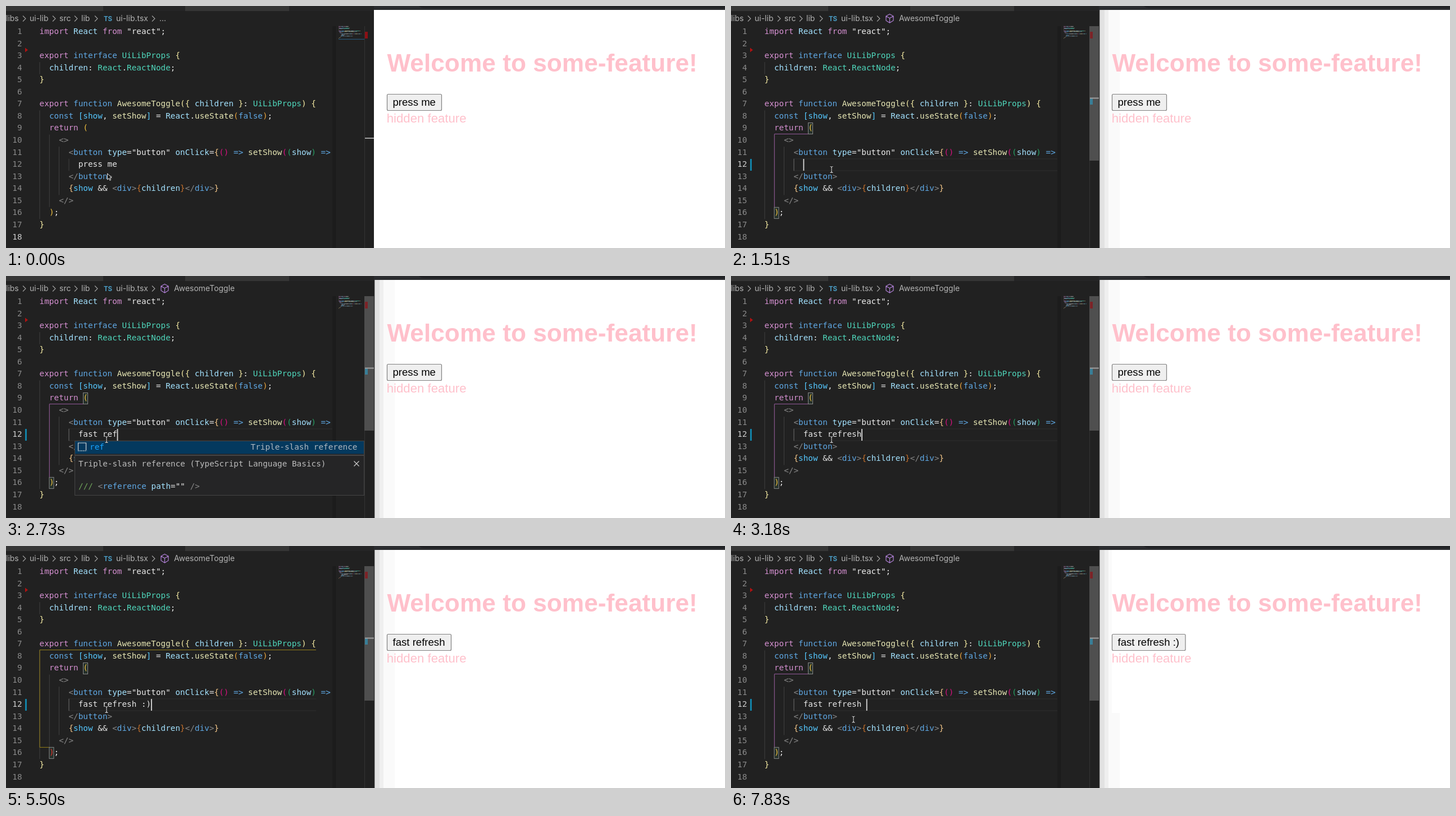
These frames come from a looping animation (1280x432 px, 8000 ms). An HTML page:

```html
<!DOCTYPE html>
<html lang="en">
<head>
<meta charset="utf-8">
<title>Fast refresh</title>
<style>
html, body { margin: 0; width: 100%; height: 100%; overflow: hidden; background: #212121; }
svg { display: block; width: 100%; height: 100%; }
text { white-space: pre; }
.code { font: 14.35px "DejaVu Sans Mono", "Noto Sans Mono", monospace; font-variant-ligatures: none; }
.crumb { font: 14px Inter, "Liberation Sans", sans-serif; fill: #b2b2b2; }
.page { font-family: "Liberation Sans", Arial, sans-serif; }
</style>
</head>
<body>
<svg id="stage" viewBox="0 0 1280 432" preserveAspectRatio="none"></svg>
<script>
const LOOP = 8000;
const CHAR = 8.64, LEFT = 59.6, ROW = 21.56, TOP = 35.5, BASE = 50;

// One letter after each "~" picks the colour of the text that follows.
const COLORS = {
  p: "#d48fd0", b: "#5fa8e4", t: "#4fd6bb", v: "#a3e2ff", f: "#e6e6b4", s: "#ececec",
  w: "#e6e6e6", g: "#868686", c: "#55c8ff", y: "#f5eba4", o: "#e8a33d", d: "#c5702a",
  m: "#d6127f", e: "#27a065", k: "#f0c040", n: "#6fa35a", h: "#18a3ff", r: "#e5312b", a: "#f5c88a"
};
const CODE = [
  '~pimport ~vReact ~pfrom ~s"react"~w;',
  '',
  '~pexport ~binterface ~tUiLibProps ~y{',
  '~w  ~vchildren~w: ~tReact~w.~tReactNode~w;',
  '~y}',
  '',
  '~pexport ~bfunction ~fAwesomeToggle~y({ ~vchildren ~y}~w: ~tUiLibProps~y) {',
  '~w  ~bconst ~c[show~w, ~fsetShow~c] ~w= ~vReact~w.~fuseState~o(~bfalse~o)~w;',
  '~w  ~preturn ~k(',
  '~w    ~g<>',
  '~w      ~g<~bbutton ~vtype~w=~s"button" ~vonClick~w=~a{~m() ~b=> ~fsetShow~m(~e(~vshow~e) ~b=>',
  '',
  '~w      ~g</~bbutton~g>',
  '~w      ~a{~cshow ~w&& ~g<~bdiv~g>~d{~vchildren~d}~g</~bdiv~g>~a}',
  '~w    ~g</>',
  '~w  ~k)~w;',
  '~y}',
  ''
];

// null means the whole line has been cut.
const TYPING = [
  [0, "press me"], [1070, null], [1330, ""], [2040, "f"], [2120, "fa"], [2210, "fas"],
  [2300, "fast"], [2380, "fast "], [2470, "fast r"], [2560, "fast re"], [2730, "fast ref"],
  [2910, "fast refr"], [3000, "fast refre"], [3090, "fast refres"], [3180, "fast refresh"],
  [4880, "fast refresh "], [5140, "fast refresh :"], [5320, "fast refresh :)"],
  [7470, "fast refresh :"], [7560, "fast refresh "]
];
const CARET = [
  [0, false], [270, true], [890, false], [1070, true], [1860, false], [2040, true],
  [3720, false], [4260, true], [4700, false], [4880, true], [5850, false],
  [6390, true], [6840, false], [7290, true]
];
const LABEL = [[0, "press me"], [4520, "fast refresh"], [6210, "fast refresh :)"]];
const BUTTON_WIDTH = { "press me": 97, "fast refresh": 114, "fast refresh :)": 130.5 };

const at = (list, t) => list.reduce((now, [start, value]) => t >= start ? value : now, list[0][1]);
const esc = s => s.replace(/&/g, "&amp;").replace(/</g, "&lt;");
const tokens = line => line.split("~").slice(1).map(s => [COLORS[s[0]], s.slice(1)]);
const rowTop = n => TOP + (n - 1) * ROW;
const rect = (x, y, w, h, fill, extra = "") =>
  `<rect x="${x}" y="${y}" width="${w}" height="${h}" fill="${fill}" ${extra}/>`;
const stroke = (d, color, width = 1, extra = "") =>
  `<path d="${d}" fill="none" stroke="${color}" stroke-width="${width}" ${extra}/>`;
const label = (x, y, s, cls, extra = "") => `<text x="${x}" y="${y}" class="${cls}" ${extra}>${esc(s)}</text>`;
const rich = (x, y, line) => `<text x="${x}" y="${y}" class="code">` +
  tokens(line).map(([c, s]) => `<tspan fill="${c}">${esc(s)}</tspan>`).join("") + "</text>";

function breadcrumbs(symbol) {
  const parts = [[0, "libs"], [42, "ui-lib"], [95, "src"], [134, "lib"], [196, "ui-lib.tsx"]];
  let out = parts.map(([x, s]) => label(x, 27, s, "crumb")).join("");
  out += [33, 86, 125, 161, 263].map(x => stroke(`M${x - 3} 17.5l5 5-5 5`, "#a2a2a2", 1.1)).join("");
  out += label(174, 27, "TS", "crumb", 'style="font-size:11.5px;font-weight:700;fill:#4a9cc4"');
  if (!symbol) return out + label(273, 27, "...", "crumb");
  return out + label(299, 27, "AwesomeToggle", "crumb") +
    stroke("M282.5 14.5l6.5 3.5v8l-6.5 4-6.5-4v-8zM276 18l6.5 3.7 6.5-3.7M282.5 21.7v8", "#b180d7", 1.2);
}

function minimap(lines) {
  let out = "";
  lines.forEach((line, i) => {
    let col = 0;
    for (const [color, s] of tokens(line)) {
      for (const word of s.matchAll(/\S+/g)) {
        const x = 592 + 0.68 * (col + word.index);
        const w = Math.min(word[0].length * 0.68, 638 - x);
        if (w > 0) out += rect(x.toFixed(1), (36 + i * 1.33).toFixed(1), w.toFixed(1), 0.9, color, 'opacity=".65"');
      }
      col += s.length;
    }
  });
  return out;
}

function guides(shift, scope) {
  const vertical = (x, from, to, color = "#404040") =>
    stroke(`M${x} ${rowTop(from)}V${rowTop(to + 1)}`, color);
  let out = vertical(60, 4, 4) + vertical(60, 8, 16 + shift) +
    vertical(77.3, 10, 15 + shift) + vertical(94.5, 11, 14 + shift);
  if (!shift) out += vertical(112, 12, 12, scope ? "#707070" : "#404040");
  const end = rowTop(16 + shift);
  if (scope === "inner") out += stroke(`M145 228.5H77.3V${end}`, "#94589a");
  if (scope === "outer") out += stroke(`M552 185.5H60V${end + 0.5}H77`, "#958019");
  return out;
}

function suggestRow(i, line, hint) {
  const y = 295 + i * 22;
  return (i ? "" : rect(123, y, 514, 22.5, "#04395e")) +
    stroke(`M128.5 ${y + 16}v-13h14v13`, "#d8d8d8", 1.2) +
    stroke(`M128 ${y + 17}h15.5`, "#d8d8d8", 1.6, 'stroke-dasharray="1.6 1.4"') +
    rich(149, y + 15, line) +
    label(625.5, y + 15, hint, "code", 'text-anchor="end" fill="#b0b8c0"');
}

function popup(typed) {
  let rows, title, sample, height;
  if (typed === "fa") {
    rows = [["~hf~wor~ha~wwaitof", "For-Await-Of Loop"], ["~hf~wore~ha~wch =>", "For-Each Loop using =>"]];
    title = "For-Await-Of Loop";
    sample = "~pfor await ~w(~bconst ~viterator ~bof ~vobject~w) {";
    height = 110;
  } else if (typed === "fast re" || typed === "fast ref") {
    rows = [[typed === "fast re" ? "~hre~wf" : "~href", "Triple-slash reference"]];
    title = "Triple-slash reference";
    sample = '~n/// ~g<~breference ~vpath~w=~s"" ~g/>';
    height = 71;
  } else return "";
  const bottom = 297 + rows.length * 22;
  const frame = 'stroke="#454545"';
  return rect(122.5, 294.5, 515, bottom - 294, "#252526", frame) +
    rows.map(([line, hint], i) => suggestRow(i, line, hint)).join("") +
    rect(122.5, bottom + 1.5, 515, height, "#252526", frame) +
    label(129, bottom + 21, title + " (TypeScript Language Basics)", "code", 'fill="#bcbcbc"') +
    stroke(`M619.5 ${bottom + 11.5}l9 9m0-9l-9 9`, "#ccc", 1.2) +
    rich(129, bottom + 61, sample);
}

function pointer(t) {
  if (t < 90) return `<path d="M180.5 299v11l2.6-2.3 1.8 3.6 1.7-.8-1.7-3.6 3.3-.3z" fill="#161616" stroke="#eee"/>`;
  const step = Math.max(0, Math.min(5, Math.floor((t - 6030) / 90)));
  const k = step / 5, ease = k * k * (3 - 2 * k);
  const x = 179 + 39 * ease, y = 292 + 17.5 * ease;
  const beam = `M${x - 2.5} ${y - 5.5}q2.5 0 2.5 2v7q0 2-2.5 2M${x + 2.5} ${y - 5.5}q-2.5 0-2.5 2v7q0 2 2.5 2`;
  return stroke(beam, "#111", 2.4) + stroke(beam, "#ddd", 1.1);
}

function editor(t) {
  const typed = at(TYPING, t), cut = typed === null, shift = cut ? -1 : 0;
  const clicked = t >= 270, changed = t >= 1070;
  const smile = t >= 5320 && t < 7470;
  const scope = !clicked ? "" : t >= 5500 && t < 7830 ? "outer" : "inner";
  const lines = CODE.slice();
  if (cut) lines.splice(11, 1);
  else lines[11] = "~w        " + typed;
  if (smile) lines[15] = "~w  ~r)~w;";

  let out = rect(0, 0, 655, 432, "#212121") + rect(0, 0, 655, 9, "#252526") +
    rect(0, 0, 173, 9, "#363636") + rect(319, 0, 185, 9, "#363636") + breadcrumbs(t >= 440);

  if (clicked) {
    const from = changed ? 112 : 176;
    const to = !changed ? 408 : scope === "outer" ? 552 : 586;
    out += stroke(`M${from} 273H${to}M${from} 294H${to}`, "#2f2f2f");
  }
  out += guides(shift, scope);
  if (clicked) {
    const box = 'stroke="#888"';
    out += rect(137.5, 208.5, 8, 20, "#25302a", box) + rect(77, rowTop(16 + shift) + 0.5, 8, 20, "#25302a", box);
  }

  const active = clicked ? 12 : 18;
  lines.forEach((line, i) => {
    const y = BASE + i * ROW;
    out += label(28.6, y, String(i + 1), "code", `text-anchor="end" fill="${i + 1 === active ? "#d0d0d0" : "#8a8a8a"}"`);
    if (line) out += rich(LEFT, y, line);
  });
  out += `<path d="M34 74.5l5 4-5 4z" fill="#b01212"/>`;
  if (changed) out += rect(34, 273, 3, 21, "#1283a8");

  // minimap and overview ruler
  out += rect(581, 36, 5, 396, "#1c1c1c") + stroke("M586.5 36V432", "#191919") + minimap(lines);
  if (!clicked) out += stroke("M592 59.3H638", "#2a5f86");
  out += stroke("M638.5 36V432", "#333");
  if (t >= 90) out += rect(638, 36, 17, 240, "#4f4f4f");
  out += rect(639, 46, 5, 12, t >= 90 ? "#7c2327" : "#8c1015");
  if (changed) out += rect(639, 165, 5, 11, "#387f98");
  out += rect(639, clicked ? 163.5 : 235, 16, 2, "#a0a0a0");

  if (t >= 890 && t < 1070) out += rect(181, 285, 8, 9, "#b4b4b4");
  if (at(CARET, t)) {
    const col = changed ? 8 + (typed || "").length : 14;
    out += rect((LEFT + col * CHAR - 0.2).toFixed(1), 273, 1.8, 21, "#d8d8d8");
  }
  return out + popup(typed) + pointer(t);
}

function page(t) {
  const name = at(LABEL, t);
  let out = rect(655, 0, 625, 432, "#fff");
  if (t >= 350) {
    out += rect(655, 7, 1.6, 425, "#2a2a2a") + rect(656.6, 7, 8.4, 425, "#e2e2e2") + rect(665, 7, 7, 425, "#efefef");
    const y = t >= 6120 ? 298 : 7;
    out += rect(672, 7, 6, 425, "#fafafa") + rect(678, y, 14, 432 - y, "#fafafa");
  }
  out += rect(655, 0, 625, 7, "#2b2c2f") +
    `<path d="M735 0q3 3.5 12 3.5H1280V0z" fill="#1f2023"/>`;
  out += label(678.4, 117.2, "Welcome to some-feature!", "page", 'font-size="44.25" font-weight="700" fill="#ffc0cb"');
  out += rect(678.5, 157.5, BUTTON_WIDTH[name], 29, "#efefef", 'rx="2" stroke="#808080" stroke-width="1.2"');
  out += label(688.5, 177.7, name, "page", 'font-size="18.6" fill="#000"');
  return out + label(677.7, 207.5, "hidden feature", "page", 'font-size="22.2" fill="#ffc0cb"');
}

const stage = document.getElementById("stage");
let shown = "";

function draw(t) {
  const next = editor(t) + page(t);
  if (next !== shown) stage.innerHTML = shown = next;
}

const start = performance.now();
function tick() {
  draw((performance.now() - start) % LOOP);
  requestAnimationFrame(tick);
}
draw(0);
requestAnimationFrame(tick);
</script>
</body>
</html>
```
